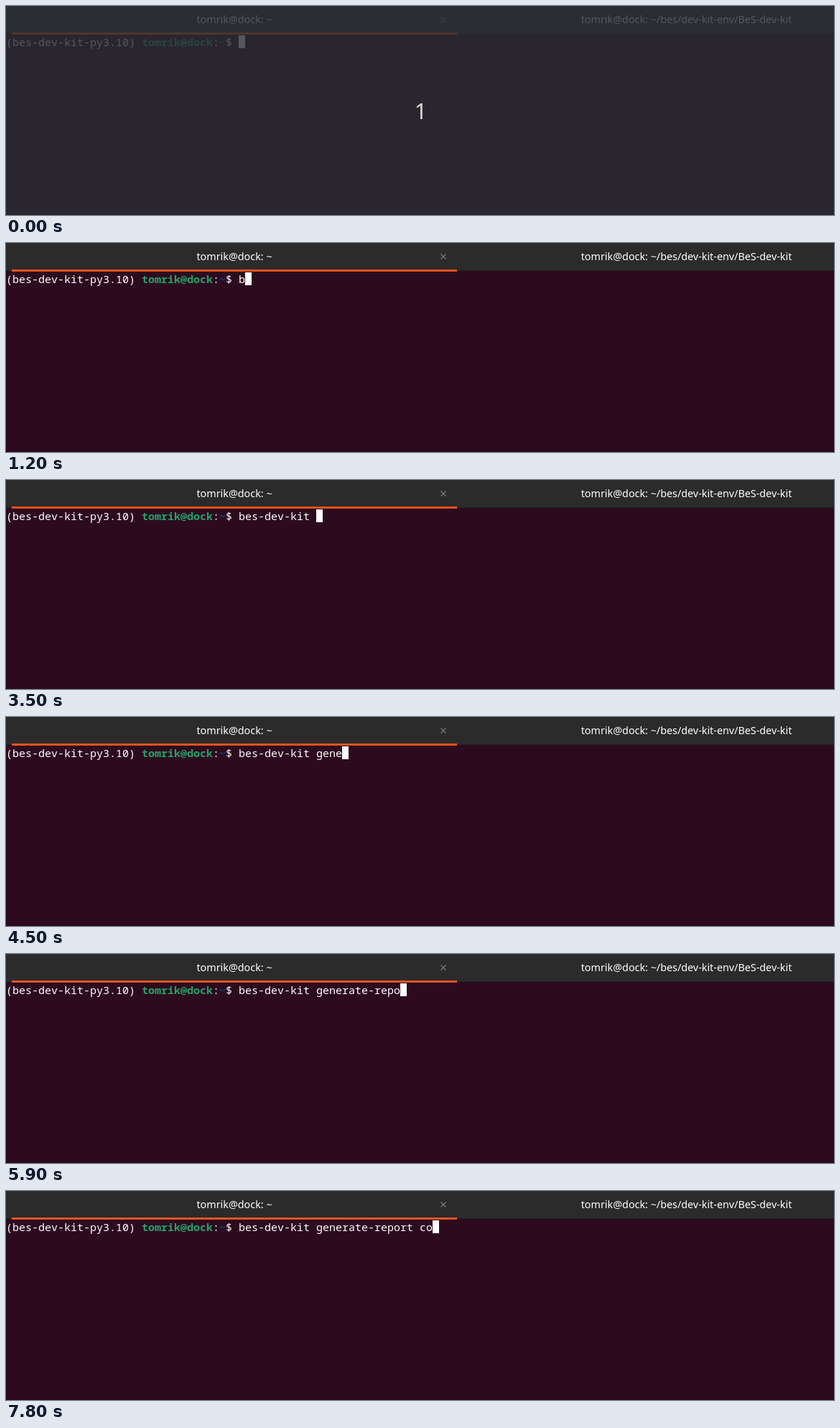
An HTML page with a canvas for the animation above (8000 ms loop, 1153 by 292 pixels).

```html
<!DOCTYPE html>
<html lang="en">
<head>
<meta charset="utf-8">
<title>Terminal typing</title>
<style>
  html, body { margin: 0; width: 100%; height: 100%; overflow: hidden; background: #2d0b1f; }
  canvas { display: block; }
</style>
</head>
<body>
<canvas id="stage" width="1153" height="292"></canvas>
<script>
const ctx = document.getElementById('stage').getContext('2d');
const LOOP = 8000, CELL = 9;
const USER = 'tomrik@dock';
const COMMAND = 'bes-dev-kit generate-report co';
const MONO = '15px "Noto Sans Mono", monospace';
const SANS = '14.33px "Noto Sans", sans-serif';

// Time in ms at which each character of the command appears
const KEYS = [
  1200, 1300, 1500, 1900, 2000, 2000, 2400, 2800, 2900, 3200, 3300, 3500,
  4000, 4100, 4300, 4500, 4700, 4800, 5000, 5200, 5300,
  5500, 5700, 5800, 5900, 6200, 6300, 6300, 7800, 7800
];
const CURSOR_OFF = [[500, 1100], [6900, 7600]];

function rect(color, x, y, w, h) {
  ctx.fillStyle = color;
  ctx.fillRect(x, y, w, h);
}

function text(str, x, y, font, color, align = 'left') {
  ctx.font = font;
  ctx.fillStyle = color;
  ctx.textAlign = align;
  ctx.fillText(str, x, y);
}

function drawTabs() {
  rect('#2b2b2b', 0, 0, 1153, 39);
  rect('#232323', 0, 38, 1153, 1);
  rect('#e95420', 8, 37, 620, 3);
  text(USER + ': ~', 318, 24, SANS, '#fff', 'center');
  text(USER + ': ~/bes/dev-kit-env/BeS-dev-kit', 947.5, 24, SANS, '#fff', 'center');
  ctx.strokeStyle = '#777';
  ctx.lineWidth = 1.4;
  ctx.beginPath();
  ctx.moveTo(605.5, 15.5);
  ctx.lineTo(612.5, 22.5);
  ctx.moveTo(612.5, 15.5);
  ctx.lineTo(605.5, 22.5);
  ctx.stroke();
}

function drawPrompt(t) {
  let column = 0;
  const put = (str, color = '#fff', weight = 500) => {
    text(str, column * CELL, 56, `${weight} ${MONO}`, color);
    column += str.length;
  };
  put('(bes-dev-kit-py3.10) ');
  put(USER, '#26a269', 700);
  put(':');
  put('~', '#12488b', 700);
  put('$ ');
  put(COMMAND.slice(0, KEYS.filter(key => key <= t).length));
  if (!CURSOR_OFF.some(([from, to]) => t >= from && t < to)) {
    rect('#fff', column * CELL, 41, CELL, 18);
  }
}

function drawCountdown() {
  rect('rgba(42, 46, 52, 0.8)', 0, 0, 1153, 292);
  text('1', 577.5, 158, '31px "Noto Sans", sans-serif', '#dcdad2', 'center');
}

function frame() {
  const t = performance.now() % LOOP;
  rect('#2d0b1f', 0, 0, 1153, 292);
  drawTabs();
  drawPrompt(t);
  if (t < 100) drawCountdown();
  requestAnimationFrame(frame);
}
frame();
</script>
</body>
</html>
```
